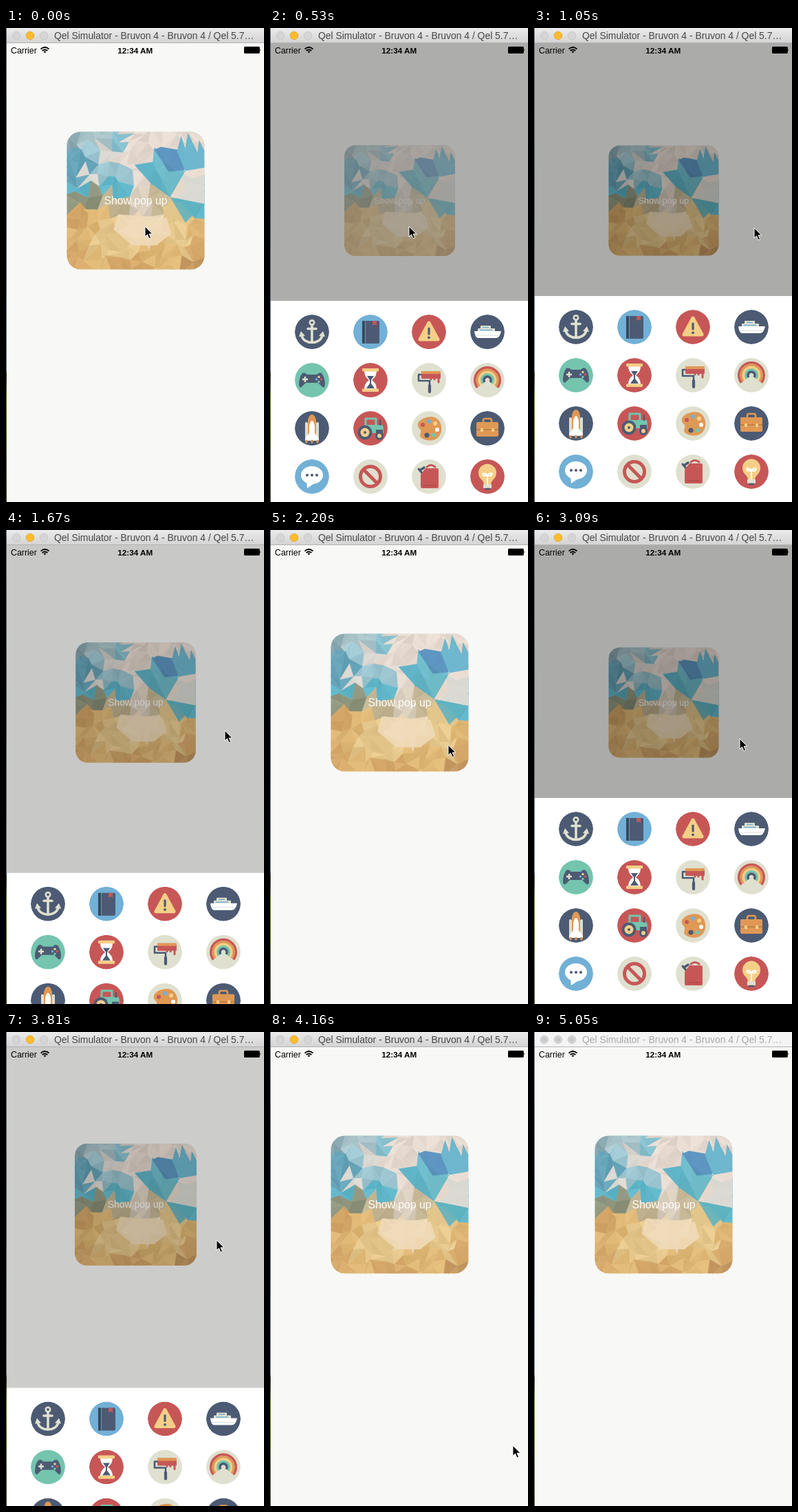
An HTML page for the animation above (5.15 s loop, 375 by 688 pixels).

```html
<!DOCTYPE html>
<html lang="en">
<head>
<meta charset="utf-8">
<title>Pop up menu</title>
<style>
  html, body { margin: 0; width: 100%; height: 100%; overflow: hidden; background: #f8f8f6; }
  svg { display: block; width: 375px; height: 688px; }
  text { font-family: "Liberation Sans", Arial, sans-serif; }
</style>
</head>
<body>
<svg viewBox="0 0 375 688">
  <defs>
    <linearGradient id="bar" x2="0" y2="1">
      <stop stop-color="#ebebeb"/><stop offset="1" stop-color="#d3d3d3"/>
    </linearGradient>
    <linearGradient id="desk" x2="0" y2="1">
      <stop stop-color="#53687a"/><stop offset=".35" stop-color="#2f4a66"/>
      <stop offset=".72" stop-color="#4d6a86"/><stop offset=".73" stop-color="#182010"/>
      <stop offset=".78" stop-color="#4d6a1c"/><stop offset="1" stop-color="#2c3c12"/>
    </linearGradient>
    <clipPath id="tile"><rect width="200" height="200" rx="20"/></clipPath>
    <clipPath id="disc"><circle r="25"/></clipPath>
  </defs>
  <rect width="375" height="688" fill="#f8f8f6"/>

  <g id="button">
    <g id="beach" clip-path="url(#tile)" transform="translate(-100 -100)"></g>
    <text id="label" y="5.5" font-size="15.8" fill="#fff" fill-opacity=".93" text-anchor="middle">Show pop up</text>
  </g>

  <rect id="dim" y="22" width="375" height="666"/>
  <g id="popup"><rect width="375" height="320" fill="#fff"/></g>

  <g id="status">
    <text x="7" y="37" font-size="12.4">Carrier</text>
    <text x="187.8" y="37" font-size="11.7" font-weight="bold" text-anchor="middle">12:34 AM</text>
    <g fill="none" stroke="#000" stroke-width="1.9">
      <path d="M50.5 30.6Q56.5 25.4 62.5 30.6M52.7 33Q56.5 29.8 60.3 33"/>
      <path d="M54.6 34.2Q56.5 32.8 58.4 34.2L56.5 36.4Z" fill="#000" stroke="none"/>
    </g>
    <rect x="346" y="27" width="22.8" height="10" rx="1.5"/>
    <path d="M369.4 30.2q1.6 1.8 0 3.6z"/>
  </g>

  <g id="titlebar">
    <rect id="barFill" width="375" height="22"/>
    <path d="M0 21.5H375" stroke="#b3b3b3"/>
    <g id="lights"></g>
    <text id="title" x="70" y="16" font-size="13.9">Qel Simulator - Bruvon 4 - Bruvon 4 / Qel 5.7…</text>
  </g>
  <rect width="1" height="688" fill="url(#desk)"/>
  <path id="cursor" d="M0 0V15L3.5 11.8 6 17.6 8.6 16.5 6.1 10.9H11Z" stroke="#fff" stroke-width="1"/>
</svg>

<script>
const $ = id => document.getElementById(id);
const NAVY = '#4c5b73', BLUE = '#72b0d6', RED = '#c75757', TEAL = '#74c4ae',
      CREAM = '#dfe0cf', YELLOW = '#f5cf87', ORANGE = '#e09855', WHITE = '#fff', DARK = '#3b4759';

const shape = (d, fill) => `<path d="${d}" fill="${fill}"/>`;
const line = (d, color, width, cap = 'round') =>
  `<path d="${d}" fill="none" stroke="${color}" stroke-width="${width}" stroke-linecap="${cap}" stroke-linejoin="round"/>`;
const dot = (x, y, r, fill) => `<circle cx="${x}" cy="${y}" r="${r}" fill="${fill}"/>`;
const box = (x, y, w, h, fill, rx = 0) =>
  `<rect x="${x}" y="${y}" width="${w}" height="${h}" rx="${rx}" fill="${fill}"/>`;
const arch = (r, color) => {
  const x = r * .8, y = r * .6;
  return line(`M${-x} ${y}A${r} ${r} 0 1 1 ${x} ${y}`, color, 3.6, 'butt');
};

const icons = [
  [NAVY, line('M0-10V15M-6-4.5H6M-15 5C-12 19 12 19 15 5', CREAM, 3.6)
    + `<circle cy="-13.5" r="3.2" fill="none" stroke="${CREAM}" stroke-width="2.6"/>`
    + shape('M-19 7L-16-1-10 6ZM19 7L16-1 10 6Z', CREAM)],
  [BLUE, box(-12, -16, 25, 33, NAVY, 2) + box(-12, -16, 4, 33, DARK, 1) + line('M-7.5-16V17', BLUE, .8)
    + shape('M3-16H9V-9L6-11 3-9Z', RED)],
  [RED, `<path d="M0-13L13 11H-13Z" fill="${YELLOW}" stroke="${YELLOW}" stroke-width="5" stroke-linejoin="round"/>`
    + line('M0-5V3', NAVY, 3.2) + dot(0, 8.3, 1.9, NAVY)],
  [NAVY, box(-10, -9, 15, 5, CREAM, 1) + box(-14, -5, 25, 5, CREAM, 1)
    + line('M-7-6.5H2M-11-2.5H7', BLUE, 1.6, 'butt')
    + shape('M-19-1H20Q18 9 12 9H-14Q-18 8-19-1Z', WHITE) + line('M-17 5H16', '#d9dde2', 1)],
  [TEAL, shape('M-14-10Q-10-12-7-8H7Q10-12 14-10 19-4 19 7 18 12 15 10L9 4H-9L-15 10Q-18 12-19 7-19-4-14-10Z', NAVY)
    + line('M-10-5V3M-14-1H-6', CREAM, 2.5, 'butt')
    + dot(10, -4.5, 1.7, YELLOW) + dot(10, 2.5, 1.7, TEAL) + dot(6.5, -1, 1.7, BLUE) + dot(13.5, -1, 1.7, RED)],
  [RED, shape('M-9-13H9Q9-5 2 0 9 5 9 13H-9Q-9 5-2 0-9-5-9-13Z', WHITE)
    + shape('M-5-6H5L1 0V5L6 12H-6L-1 5V0Z', NAVY)
    + box(-12, -17, 24, 4.5, YELLOW, 1) + box(-12, 12.5, 24, 4.5, YELLOW, 1)],
  [CREAM, line('M-9-8H-15V1H1V7', NAVY, 2.6) + line('M1 8V17', NAVY, 4.2)
    + box(-11, -13, 28, 11, RED, 1) + box(-11, -13, 28, 4, ORANGE, 1)
    + line('M3-3V-1M8-3V-1M14-3V3', RED, 3)],
  [CREAM, arch(18.2, RED) + arch(14.8, ORANGE) + arch(11.5, YELLOW) + arch(8.2, TEAL) + arch(5, NAVY)],
  [NAVY, shape('M-6 15V-12Q-4-20 0-20T6-12V15Z', ORANGE)
    + box(-10, -9, 4, 25, CREAM, 2) + box(6, -9, 4, 25, CREAM, 2)
    + shape('M-4-4Q0-18 4-4V7L10 15V18H-10V15L-4 7Z', WHITE) + line('M-8 18V20M8 18V20M0 18V20', ORANGE, 3)],
  [RED, line('M-7-3V-14H8V-3', TEAL, 3) + shape('M-10-5H17Q19-5 19 7H-4Z', TEAL)
    + line('M14-5V-11', NAVY, 2.5) + box(8, 2, 10, 5, NAVY)
    + dot(-8, 6, 10.5, NAVY) + dot(-8, 6, 6.5, YELLOW) + dot(-8, 6, 2, NAVY)
    + dot(13, 11, 6, NAVY) + dot(13, 11, 3, YELLOW)],
  [CREAM, shape('M-3-16C12-20 20-8 18 4 15 19 0 20-9 15-17 11-9 6-13 1-21-6-13-14-3-16Z', ORANGE)
    + dot(-9, -5, 3, RED) + dot(0, -10, 3, BLUE) + dot(9, -7, 3, YELLOW)
    + dot(12, 2, 3, WHITE) + dot(7, 10, 3, TEAL) + dot(-3, 10, 3.6, NAVY)],
  [NAVY, `<rect x="-6" y="-14" width="12" height="10" rx="2.5" fill="none" stroke="${ORANGE}" stroke-width="2.6"/>`
    + box(-16, -9, 32, 21, ORANGE, 2) + line('M-16 2H16', '#b97a40', 1.6, 'butt')
    + box(-10, 0, 4, 5, YELLOW, 1) + box(6, 0, 4, 5, YELLOW, 1)],
  [BLUE, `<ellipse cy="-2" rx="16" ry="13" fill="${WHITE}"/>` + shape('M-8 6L-7 17 5 9Z', WHITE)
    + dot(-7, -2, 2, NAVY) + dot(0, -2, 2, NAVY) + dot(7, -2, 2, NAVY)],
  [CREAM, `<circle r="14.5" fill="none" stroke="${RED}" stroke-width="5"/>` + line('M-10-10L10 10', RED, 5)],
  [CREAM, line('M-10-5L-15-11', NAVY, 3) + line('M-3-14Q3-19 9-14', RED, 3)
    + shape('M-12-3L-5-12H12Q14-12 14-9V15Q14 17 12 17H-10Q-12 17-12 15Z', RED)
    + line('M-8 13H10', '#b04a4a', 1.5) + line('M-13-9L-7-13', NAVY, 3.5)],
  [RED, shape('M-5 12Q-5 8-9 4A13 13 0 1 1 9 4Q5 8 5 12Z', YELLOW)
    + line('M0 10V-2C-9-10-9 2 0-2 9 2 9-10 0-2', WHITE, 2)
    + box(-6, 11, 12, 6, CREAM, 1) + line('M-3 18H3', NAVY, 2.5)],
];

icons.forEach(([color, art], i) => {
  const x = 61 + 85 * (i % 4), y = 45 + 70 * Math.floor(i / 4);
  $('popup').innerHTML += `<g transform="translate(${x} ${y})" clip-path="url(#disc)">${dot(0, 0, 25, color)}${art}</g>`;
});

// Low-poly beach: each facet takes the tone of the nearest swatch.
const tones = {
  '#8aa8b0': [[8, 8]], '#a9c4ca': [[32, 10], [55, 10]], '#86bfcd': [[70, 15]],
  '#e6dad0': [[103, 12], [127, 14], [180, 12], [85, 38], [110, 36], [102, 74]],
  '#d9d5cf': [[50, 36], [31, 66], [62, 28]], '#66a5ba': [[10, 38], [24, 42], [10, 66]],
  '#9cc6d1': [[36, 30], [50, 57], [80, 60]], '#5fb6c9': [[62, 74], [76, 82], [15, 84], [194, 110]],
  '#8c937a': [[10, 101], [36, 92]], '#c3b592': [[56, 100], [82, 97], [130, 96]], '#d8ccbb': [[110, 98]],
  '#e5c68a': [[60, 142], [161, 132], [46, 165], [82, 172], [166, 160]],
  '#d5a869': [[15, 125], [190, 166], [12, 182], [92, 191]],
  '#deb673': [[40, 124], [185, 140], [20, 150], [130, 173], [42, 190], [150, 188]],
  '#f0dcbe': [[110, 140]], '#c79a63': [[192, 192]],
};
const swatches = Object.entries(tones).flatMap(([color, spots]) => spots.map(([x, y]) => ({ color, x, y })));

let seed = 11;
const random = () => (seed = seed * 16807 % 2147483647) / 2147483647;

function drawBeach() {
  const cells = 13, size = 200 / cells, row = cells + 3;
  const nodes = Array.from({ length: row ** 2 }, (_, i) => [
    (i % row - 1 + (random() - .5) * .85) * size,
    (Math.floor(i / row) - 1 + (random() - .5) * .85) * size]);
  const at = (c, r) => nodes[r * row + c];
  const facet = points => {
    const [cx, cy] = [0, 1].map(k => (points[0][k] + points[1][k] + points[2][k]) / 3);
    const gap = s => (s.x - cx) ** 2 + (s.y - cy) ** 2;
    const { color } = swatches.reduce((a, b) => gap(b) < gap(a) ? b : a);
    const shade = (random() - .5) * 20;
    const rgb = [1, 3, 5].map(k => Math.round(parseInt(color.slice(k, k + 2), 16) + shade));
    return `<polygon points="${points.join(' ')}" fill="rgb(${rgb})" stroke="rgb(${rgb})" stroke-width=".6"/>`;
  };
  let out = '';
  for (let r = 0; r < row - 1; r++) for (let c = 0; c < row - 1; c++) {
    const a = at(c, r), b = at(c + 1, r), d = at(c, r + 1), e = at(c + 1, r + 1);
    out += random() < .5 ? facet([a, b, d]) + facet([b, e, d]) : facet([a, b, e]) + facet([a, e, d]);
  }
  const landmarks = shape('M150 95L172 57 200 45V105Z', '#ebdfd4')
    + shape('M127 22L148 48 172 57 150 95 122 70Z', '#62bbce')
    + shape('M98 48L125 44 150 95 122 75Z', '#4fb0c8')
    + shape('M127 26L137 22 160 26 192 30 170 56 148 58Z', '#4b8dbf')
    + shape('M160 28L166 6 172 24 176 2 190 30 192 12 200 28V52L172 57Z', '#5db2ce')
    + shape('M150 95L200 105 172 132Z', '#5fb3c0')
    + shape('M150 95L172 132 140 124Z', '#e3c68c')
    + shape('M74 120L145 125 152 148 130 165 95 165 68 142Z', '#f0dbb9');
  $('beach').innerHTML = out + `<g opacity=".88">${landmarks}</g>`;
}
drawBeach();

// Screen refreshes come in bursts: first, last, count.
const LOOP = 5150;
const refreshes = [[360, 870, 7], [960, 1050, 2], [1670, 2110, 6], [2200, 2200, 1], [2560, 3000, 6],
  [3090, 3180, 2], [3810, 4250, 6], [4520, 4690, 3], [5050, 5050, 1]]
  .flatMap(([from, to, n]) => Array.from({ length: n }, (_, i) =>
    n === 1 ? from : Math.round((from + (to - from) * i / (n - 1)) / 10 - .01) * 10));
const lastRefresh = t => refreshes.reduce((seen, r) => r <= t ? r : seen, 0);

const cycles = [{ open: 295, close: 1603 }, { open: 2472, close: 3733.5 }];
const path = [[0, 202, 288], [610, 202, 288], [700, 218, 288], [780, 252, 288], [870, 292, 288], [960, 313, 290],
  [1050, 320, 290], [1670, 318, 291], [2110, 269, 320], [2200, 259, 312], [2830, 259, 312], [3000, 278, 307],
  [3090, 299, 303], [3180, 306, 302], [3810, 306, 302], [4250, 365, 677], [4430, 365, 677], [4690, 378, 690]];

// Share of the way left for a critically damped spring.
function remaining(ms, rate) {
  const x = Math.max(0, ms) * rate / 1000, left = (1 + x) * Math.exp(-x);
  return left < .002 ? 0 : left;
}

function cursorAt(t) {
  const i = path.findIndex(p => p[0] > t);
  if (i < 0) return path[path.length - 1].slice(1);
  const [t0, x0, y0] = path[i - 1], [t1, x1, y1] = path[i], k = (t - t0) / (t1 - t0);
  return [x0 + (x1 - x0) * k, y0 + (y1 - y0) * k];
}

function drawTitlebar(active) {
  $('barFill').setAttribute('fill', active ? 'url(#bar)' : '#f4f4f4');
  $('title').setAttribute('fill', active ? '#464646' : '#a9a9a9');
  $('lights').innerHTML = [15, 35, 55].map((x, i) => {
    const amber = active && i === 1;
    return `<circle cx="${x}" cy="11" r="5.8" fill="${amber ? '#fdbc2e' : '#d5d5d5'}" stroke="${amber ? '#e0a22a' : '#c4c4c4'}" stroke-width=".8"/>`
      + (active ? '' : dot(x, 11, 3.2, '#c6c6c6'));
  }).join('');
}

let shown = -1;
function render(time) {
  const t = lastRefresh(time % LOOP);
  if (t === shown) return;
  shown = t;
  const { open, close } = t < cycles[1].open ? cycles[0] : cycles[1];
  const p = t > close ? remaining(t - close, 19) : 1 - remaining(t - open, 24);
  const fade = t > open ? Math.min(1, .4 + .6 * (t - open) / 520) : 1;
  $('button').setAttribute('transform', `translate(188.5 250.5) scale(${1 - .2 * p})`);
  $('button').setAttribute('opacity', fade);
  $('label').setAttribute('opacity', fade);
  $('dim').setAttribute('opacity', .31 * p);
  $('popup').setAttribute('transform', `translate(0 ${688 - 299 * p})`);
  $('cursor').setAttribute('transform', `translate(${cursorAt(t)})`);
  drawTitlebar(t < 5050);
}

const start = performance.now();
function tick() {
  render(performance.now() - start);
  requestAnimationFrame(tick);
}
tick();
</script>
</body>
</html>
```
